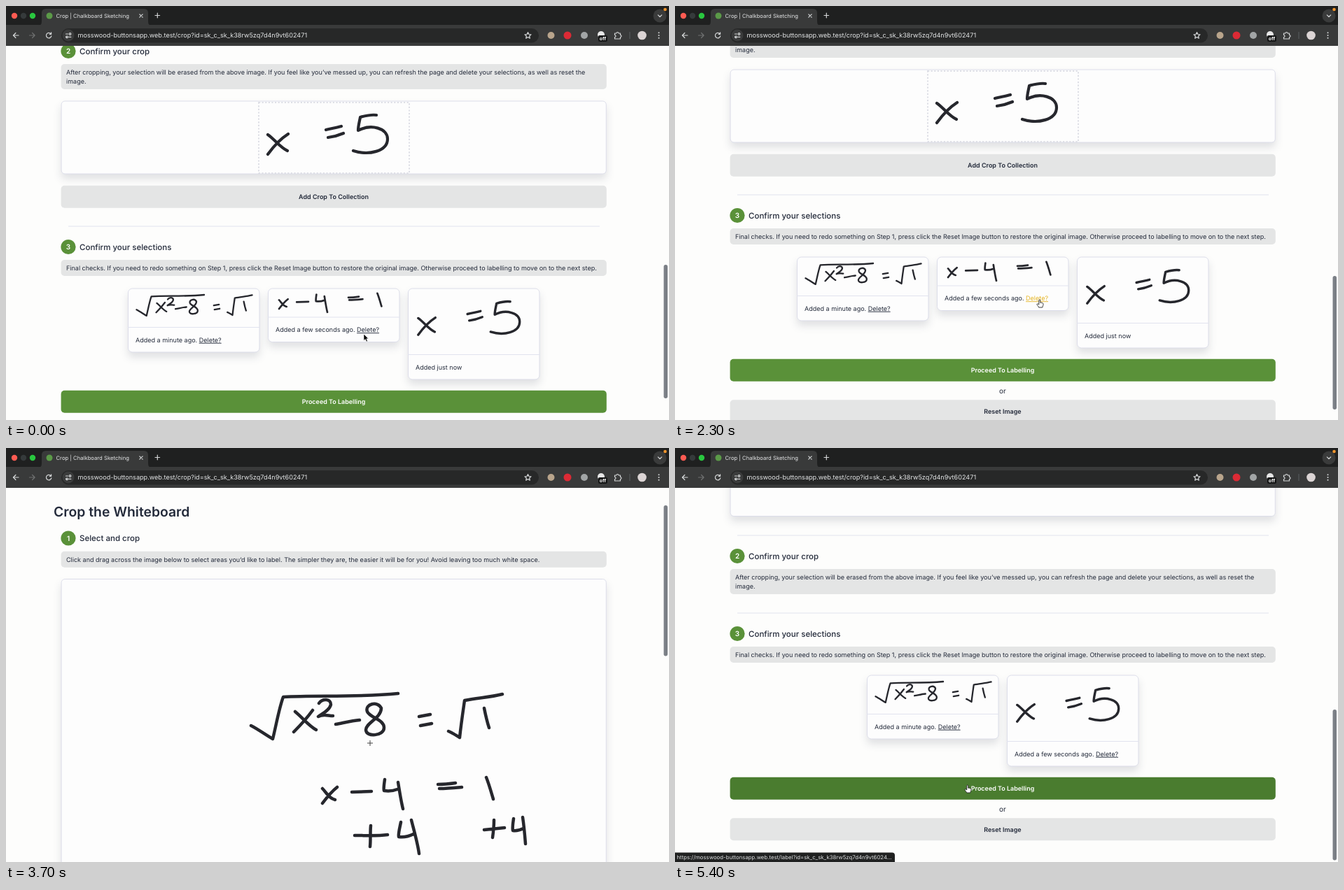
Animation of 947x592 px, one loop 5.5 s. Source, as an HTML page:

```html
<!DOCTYPE html>
<html lang="en">
<head>
<meta charset="utf-8">
<title>Crop</title>
<style>
html, body { margin: 0; width: 100%; height: 100%; overflow: hidden; background: #fdfdfc; }
svg { display: block; width: 100vw; height: 100vh; }
text { font-family: Inter, sans-serif; text-rendering: geometricPrecision; white-space: pre; }
.card { fill: #fdfdfd; stroke: #dcdde9; filter: drop-shadow(0 7px 6px rgba(20, 25, 50, .12)); }
.ink { fill: none; stroke: #26272d; stroke-linecap: round; stroke-linejoin: round; }
.link { text-decoration: underline; }
.proceed { fill: #5a9139; }
#crop.hover .link.target { fill: #e6b422; }
#reloaded.hover .proceed { fill: #4a7c2f; }
.icon { fill: none; stroke: #d5d7d8; stroke-width: 1.2; stroke-linecap: round; stroke-linejoin: round; }
</style>
</head>
<body>
<svg id="stage" viewBox="0 0 947 592"></svg>
<script>
const DARK = '#232a3a', GREEN = '#5a9139', GRAY = '#e4e5e5';
const LEFT = 78.6, WIDTH = 779.2, CENTER = 468;

// Handwriting
const ROOT = `M350 397C360 402 372 411 381 416C386 396 390 372 396 356C440 353 500 357 560 351
  M413 377C424 386 432 397 443 403M438 375C430 386 420 397 411 406
  M447 365C452 358 464 358 464 367C462 375 452 380 446 384C453 380 460 383 467 383
  M471 395C482 393 494 390 505 389
  M536 372C531 361 512 366 516 377C520 386 540 388 540 400C540 412 514 414 514 403C514 393 536 386 536 372
  M590 384L606 381M592 397L608 394
  M632 405C637 407 643 411 648 414C650 395 653 375 655 361C672 357 690 357 709 352
  M683 372C685 382 687 391 690 400`;
const LINEAR = `M452 487C457 492 461 501 470 503M473 485C464 492 458 500 452 508
  M494 492L522 491M541 474C540 481 539 487 540 490C547 491 554 490 559 488M560 478C562 490 564 504 567 516
  M617 481C628 481 635 480 642 479M619 487C630 487 640 486 651 485M686 471C690 481 693 492 696 502`;
const PLUS_FOUR = `M498 554C515 554 530 555 545 553M521 540C520 550 521 560 520 570
  M564 535C562 545 560 552 561 556C568 557 576 555 582 552M579 532C583 548 588 565 590 580
  M683 546L712 543M697 532C697 542 696 550 695 557
  M725 530C724 537 723 543 724 547C730 548 735 546 739 544M738 528C740 541 741 553 742 566`;
const FIVE = `M374 184C383 190 392 203 402 207M403 183C392 190 382 201 374 212
  M457 177C465 175 472 174 479 172M460 188C468 187 475 185 482 182
  M529 156C521 155 513 157 506 159C505 165 503 171 503 178
  C522 168 545 175 545 190C545 208 518 214 496 207`;

const text = (x, cy, str, size = 9.03, attrs = '', fill = DARK) =>
  `<text x="${x}" y="${cy + size * .36}" font-size="${size}" fill="${fill}" ${attrs}>${str}</text>`;
const rect = (x, y, w, h, attrs, r = 5) =>
  `<rect x="${x}" y="${y}" width="${w}" height="${h}" rx="${r}" ${attrs}/>`;
const dot = (x, y, r, fill) => `<circle cx="${x}" cy="${y}" r="${r}" fill="${fill}"/>`;
const ink = (d, width = 4.5, transform = '') =>
  `<path class="ink" d="${d}" stroke-width="${width}" transform="${transform}"/>`;
const icon = (d, attrs = '') => `<path class="icon" d="${d}" ${attrs}/>`;
const rule = (x, y, w) => rect(x, y - .5, w, 1, 'fill="#e1e3ef"', 0);
const note = (y, lines) => rect(LEFT, y, WIDTH, 10 + 13 * lines.length, `fill="${GRAY}"`) +
  lines.map((line, i) => text(86, y + 11.7 + 13.2 * i, line)).join('');
const heading = (y, number, title) => dot(89, y, 10.6, GREEN) +
  text(89, y, number, 10, 'text-anchor="middle" font-weight="600"', '#fff') +
  text(105, y, title, 11.5, 'font-weight="500"');
const button = (y, label, attrs, fill = DARK) => rect(LEFT, y - .2, WIDTH, 32, attrs) +
  text(CENTER, y + 15.8, label, 8.97, 'text-anchor="middle" font-weight="600"', fill);

const place = (x, y, scale, x0, y0) => `translate(${x} ${y}) scale(${scale}) translate(${-x0} ${-y0})`;
const drawings = {
  root: { height: 55.5, art: (x, y) => ink(ROOT, 5, place(x + 12, y + 9, .46, 349, 351)) },
  linear: { height: 41, art: (x, y) => ink(LINEAR, 4.5, place(x + 13, y + 8, .6, 447, 473)) },
  five: { height: 94.5, art: (x, y) => ink(FIVE, 4, place(x + 3.7, y + 2.6, .848, 361, 137)) },
};
function card(x, y, kind, age, linkClass) {
  const { height, art } = drawings[kind];
  const link = linkClass ? ` <tspan class="${linkClass}">Delete?</tspan>` : '';
  return rect(x + .5, y, 187.5, height + 35.5, 'class="card"', 6) + rule(x, y + height, 188) +
    art(x, y) + text(x + 11, y + height + 18, 'Added ' + age + link);
}
const confirmCrop = y => heading(y, 2, 'Confirm your crop') + note(y + 18.5, [
  'After cropping, your selection will be erased from the above image. If you feel like you’ve messed up, you can refresh the page and delete your selections, as well as reset the',
  'image.']);
const confirmSelections = (y, cards) => rule(89, y - 29.5, 759) +
  heading(y, 3, 'Confirm your selections') + note(y + 18.5, [
    'Final checks. If you need to redo something on Step 1, press click the Reset Image button to restore the original image. Otherwise proceed to labelling to move on to the next step.']) +
  cards.map(([x, ...rest]) => card(x, y + 59.5, ...rest)).join('') +
  button(y + 205.5, 'Proceed To Labelling', 'class="proceed"', '#fff') +
  text(CENTER, y + 250.5, 'or', 10, 'text-anchor="middle"') +
  button(y + 264, 'Reset Image', `fill="${GRAY}"`);

const cropPage = confirmCrop(64.5) +
  rect(LEFT + .5, 136, WIDTH - 1, 104, 'class="card"') +
  rect(361, 138, 215, 101, 'fill="none" stroke="#dedfe6" stroke-width="2" stroke-dasharray="2.2 2.4"', 0) +
  ink(FIVE, 4.2) +
  button(257, 'Add Crop To Collection', `fill="${GRAY}"`) +
  confirmSelections(344.5, [
    [174, 'root', 'a minute ago.', 'link'],
    [374, 'linear', 'a few seconds ago.', 'link target'],
    [574, 'five', 'just now']]);

const TRAVEL = 731;
const reloadedPage = text(68, 91, 'Crop the Whiteboard', 19.35, 'font-weight="600"') +
  heading(129, 1, 'Select and crop') +
  note(147.7, ['Click and drag across the image below to select areas you’d like to label. The simpler they are, the easier it will be for you! Avoid leaving too much white space.']) +
  rect(LEFT + .5, 187.5, WIDTH - 1, 97 + TRAVEL - 187, 'class="card"') +
  ink(ROOT) + ink(LINEAR) + ink(PLUS_FOUR) +
  `<g transform="translate(0 ${TRAVEL})">` + rule(89, 125, 759) + confirmCrop(154.5) +
  confirmSelections(265.5, [
    [274, 'root', 'a minute ago.', 'link'],
    [474, 'five', 'a few seconds ago.', 'link']]) + '</g>';

const browser = rect(0, 0, 947, 28, 'fill="#1f2020"', 0) + rect(0, 27, 947, 30, 'fill="#393a3a"', 0) +
  '<path fill="#393a3a" d="M46 28Q51 28 51 22V10Q51 4 57 4H197Q203 4 203 10V22Q203 28 208 28Z"/>' +
  dot(12, 14, 4.2, '#ff5b52') + dot(25, 14, 4.2, '#353a3b') + dot(38, 14, 4.2, '#29c73f') +
  dot(62, 14, 4.5, '#5b9a48') + text(71.5, 14, '', 7.7, 'id="tab"', '#e6e7e8') +
  icon('M190.8 11.8l4.4 4.4m0-4.4l-4.4 4.4M213 13.5h6.6M216.3 10.2v6.6') +
  dot(934, 14, 9.5, '#3a3b3b') + icon('M931.3 12.8l2.7 2.7 2.7-2.7') + dot(941.5, 5, 2.3, '#f0962e') +
  icon('M18 42h-7.5m3.4-3.5l-3.5 3.5 3.5 3.5') +
  icon('M33.5 42h7.5m-3.4-3.5l3.5 3.5-3.5 3.5', 'opacity=".35"') +
  icon('M64 39.7A3.7 3.7 0 1 0 64.8 42.8M64.6 37.8v2.5h-2.5') +
  rect(79, 32, 682, 20.5, 'fill="#272828"', 10.2) + dot(89, 42, 8.5, '#3b3c3c') +
  icon('M85.5 40h3M85.5 44.3h1M89.8 44.3h3') +
  icon('M90.2 40a1.3 1.3 0 1 0 2.6 0a1.3 1.3 0 1 0-2.6 0M85.8 44.3a1.3 1.3 0 1 0 2.6 0a1.3 1.3 0 1 0-2.6 0') +
  text(102.5, 42, 'mosswood-buttonsapp.web.test/crop?id=sk_c_sk_k38rw5zq7d4n9vt602471', 9.1, '', '#e4e6e7') +
  icon('M745.5 37.5l1.3 3 3.2.3-2.4 2.2.7 3.2-2.8-1.7-2.8 1.7.7-3.2-2.4-2.2 3.2-.3z', 'stroke-width="1"') +
  dot(778.5, 42, 5, '#b9a58c') + dot(802, 42, 5.5, '#dc2a35') + dot(826, 42, 5, '#a2a5a6') +
  dot(850, 41, 5, '#e8e8e8') + rect(846, 42, 13, 9, 'fill="#151616"', 2) +
  text(852.5, 46.3, 'off', 6.8, 'text-anchor="middle" font-weight="700"', '#fff') +
  icon('M869.5 39h2.5a1.5 1.5 0 1 1 3 0h2.5v2.5a1.5 1.5 0 1 1 0 3v2.5h-8v-2.5a1.5 1.5 0 1 0 0-3z') +
  rect(890.5, 37, 1, 10, 'fill="#5b5e60"', 0) + dot(908.5, 42, 6.3, '#dcd5d5') +
  [38.3, 42, 45.7].map(y => dot(932.5, y, 1, '#d5d7d8')).join('');

const status = '<path fill="#202121" d="M0 578.5H310Q314 578.5 314 582.5V592H0Z"/>' +
  text(2.5, 585.5, 'https://mosswood-buttonsapp.web.test/label?id=sk_c_sk_k38rw5zq7d4n9vt6024...', 7.8, '', '#dfe1e2');

const cursors = {
  arrow: '<path d="M0 0V9.4L2.2 7.4L3.8 11L5.4 10.3L3.9 6.8H6.6Z" stroke="#fff" stroke-width=".6"/>',
  hand: '<path d="M-1.2 1C-1.2-.4.8-.4.8 1V4.2C3 4 5 4.6 5 6.2C5 8.5 4.2 9 3.8 11H-1.4C-2 9-4 7.8-4 6.4C-3.6 5.4-2.2 6-1.2 7Z" fill="#fff" stroke="#222" stroke-width=".9"/>',
  cross: '<path d="M-4 0H4M0-4V4" stroke="#444"/>',
};

const group = (id, content) => `<g id="${id}">${content}</g>`;
const stage = document.getElementById('stage');
stage.innerHTML = rect(0, 0, 947, 592, 'fill="#fdfdfc"', 0) + group('crop', cropPage) +
  group('loading', text(473, 77, 'Loading...', 10, 'text-anchor="middle"')) + group('reloaded', reloadedPage) +
  rect(939.5, 0, 5.5, 0, 'id="thumb" fill="#7b7f86"', 2.7) + browser + group('status', status) +
  Object.entries(cursors).map(([id, shape]) => group(id, shape)).join('');

const $ = id => document.getElementById(id);
const show = (id, on) => $(id).setAttribute('visibility', on ? 'visible' : 'hidden');
const move = (id, x, y) => $(id).setAttribute('transform', `translate(${x} ${y})`);

// Linear interpolation between [time, ...values] keys
function track(keys, t) {
  const next = keys.findIndex(key => key[0] > t);
  if (next < 0) return keys.at(-1).slice(1);
  if (next === 0) return keys[0].slice(1);
  const a = keys[next - 1], b = keys[next], k = (t - a[0]) / (b[0] - a[0]);
  return a.slice(1).map((v, i) => v + (b[i + 1] - v) * k);
}
const cropScroll = [[300, 0], [700, 25.5], [1100, 45]];
const reloadedScroll = [[3800, 0], [4000, TRAVEL]];
const pointer = [[0, 511, 469], [200, 516, 462], [1100, 516, 462], [1400, 521, 431], [1600, 521, 420],
  [2400, 521, 420], [2600, 521, 424], [2800, 521, 424], [3200, 520, 422], [4500, 520, 422], [5100, 418, 482]];
const pointerKinds = [[150, 'arrow'], [1100, 'hand'], [1500, 'arrow'], [2450, 'hand'], [3150, 'arrow'],
  [4600, 'cross'], [5150, 'arrow'], [5500, 'hand']];

function render(now) {
  const t = Math.floor(now % 5500 / 100) * 100;
  const phase = t < 2500 ? 'crop' : t < 3100 ? 'loading' : 'reloaded';
  for (const id of ['crop', 'loading', 'reloaded']) show(id, id === phase);

  const [scroll] = track(phase === 'crop' ? cropScroll : reloadedScroll, t);
  if (phase !== 'loading') move(phase, 0, -scroll);
  show('thumb', phase !== 'loading');
  $('thumb').setAttribute('y', phase === 'crop' ? 370 + scroll * .356 : 82 + scroll * 292 / TRAVEL);
  $('thumb').setAttribute('height', phase === 'crop' ? 191 : 215.5);
  $('tab').textContent = phase === 'loading' ? 'Buttons Chalkboard Sketching' : 'Crop | Chalkboard Sketching';

  const kind = pointerKinds.find(([end]) => t < end)[1];
  for (const id in cursors) show(id, id === kind);
  move(kind, ...track(pointer, t));
  $(phase).classList.toggle('hover', kind === 'hand');
  show('status', phase === 'reloaded' && kind === 'hand');
}
function loop() {
  render(performance.now());
  requestAnimationFrame(loop);
}
loop();
</script>
</body>
</html>
```
